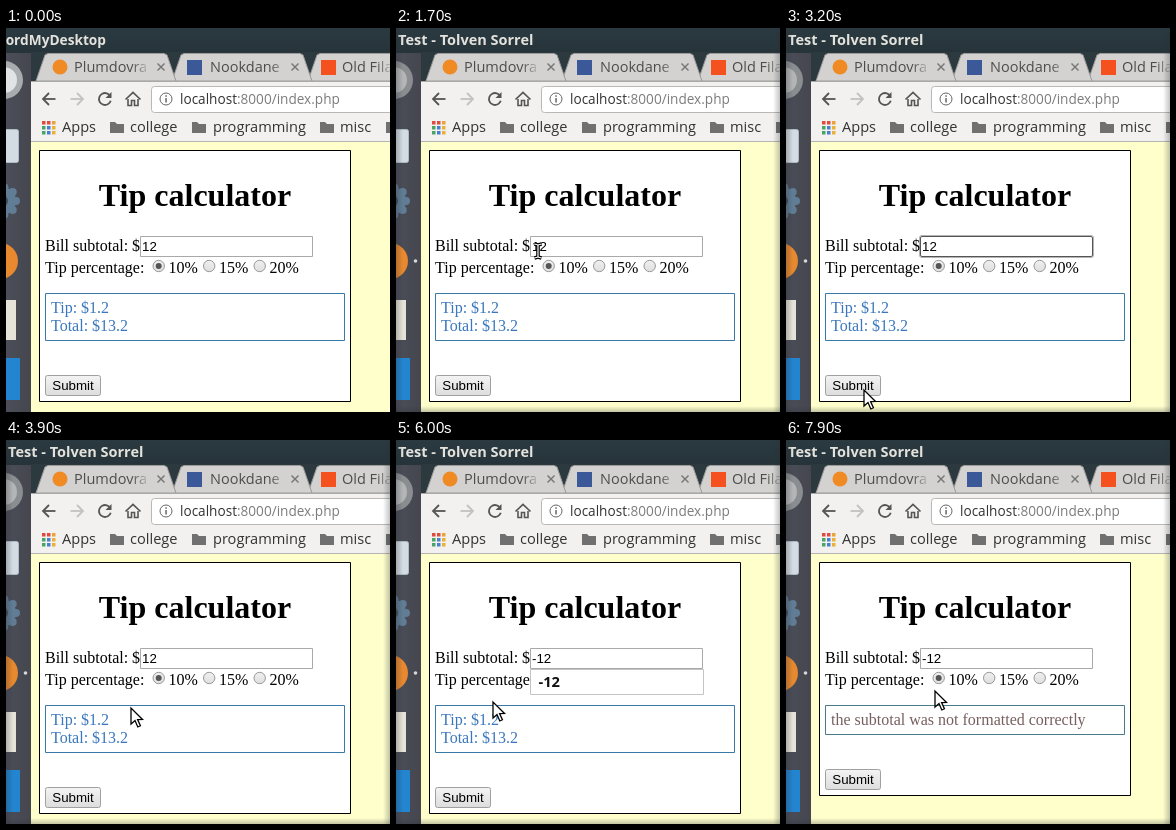
Write an HTML page with a canvas that moves like this. It is 384 px wide and 384 px high and loops after 8 s.

```html
<!DOCTYPE html>
<html lang="en">
<head>
<meta charset="utf-8">
<title>Tip calculator</title>
<style>
html, body { margin: 0; width: 100%; height: 100%; overflow: hidden; background: #ffffcc; }
canvas { display: block; width: 384px; height: 384px; }
</style>
</head>
<body>
<canvas id="stage" width="384" height="384"></canvas>
<script>
const ctx = document.getElementById('stage').getContext('2d');
const LOOP = 8000, STEP = 100;
const UI = '"Open Sans", "Noto Sans", sans-serif';
const SERIF = '"Liberation Serif", "Times New Roman", serif';
const SANS = '"Liberation Sans", Arial, sans-serif';

// Moments of change, in ms
const T = { title: 400, focus: 1900, sent: 3500, refocus: 4000, drag: 4200, minus: 4700,
            one: 5100, two: 5400, blur: 5800, close: 6300, error: 7200 };

// Pointer hot spots: time, x, y
const PATH = [
  [500, 262, 390], [800, 242, 334], [1000, 217, 331], [1300, 191, 271], [1600, 142, 223],
  [2300, 142, 223], [2600, 162, 277], [2900, 127, 332], [3200, 78, 362], [3600, 78, 362],
  [4100, 150, 217], [4200, 150, 217], [4500, 58, 209], [5600, 58, 209], [6000, 97, 262],
  [6300, 100, 312], [6700, 77, 358], [7300, 77, 358], [7800, 149, 251], [8000, 149, 251]
];

function rect(x, y, w, h, fill) {
  ctx.fillStyle = fill;
  ctx.fillRect(x, y, w, h);
}

function frame(x, y, w, h, line, fill, r = 0) {
  ctx.beginPath();
  ctx.roundRect(x + 0.5, y + 0.5, w - 1, h - 1, r);
  if (fill) { ctx.fillStyle = fill; ctx.fill(); }
  ctx.strokeStyle = line;
  ctx.lineWidth = 1;
  ctx.stroke();
}

function disc(x, y, r, fill, line) {
  ctx.beginPath();
  ctx.arc(x, y, r, 0, Math.PI * 2);
  if (fill) { ctx.fillStyle = fill; ctx.fill(); }
  if (line) { ctx.strokeStyle = line; ctx.lineWidth = 1; ctx.stroke(); }
}

function text(s, x, y, font, fill, align = 'left') {
  ctx.font = font;
  ctx.fillStyle = fill;
  ctx.textAlign = align;
  ctx.fillText(s, x, y);
}

function poly(points, fill, line, width = 1, closed = true) {
  ctx.beginPath();
  points.forEach(([x, y], i) => i ? ctx.lineTo(x, y) : ctx.moveTo(x, y));
  if (closed) ctx.closePath();
  if (fill) { ctx.fillStyle = fill; ctx.fill(); }
  if (line) { ctx.strokeStyle = line; ctx.lineWidth = width; ctx.stroke(); }
}

function fade(x0, y0, x1, y1, from, to) {
  const g = ctx.createLinearGradient(x0, y0, x1, y1);
  g.addColorStop(0, from);
  g.addColorStop(1, to);
  return g;
}

function launcher(active) {
  rect(0, 24, 25, 360, fade(0, 0, 25, 0, '#4b4e59', '#45464e'));
  disc(-2, 52, 19, active ? '#8b8e91' : '#a9acae');
  disc(-2, 52, 13, active ? '#b3b5b7' : '#e2e3e4');
  frame(-6, 101, 19, 34, '#aebbc5', '#d3dce2', 2);
  for (let i = -2; i < 3; i++) {
    const a = i * 0.7;
    disc(-4 + Math.cos(a) * 14, 173 + Math.sin(a) * 14, 4, '#617d95');
  }
  disc(-4, 173, 14, '#617d95');
  disc(-4, 173, 6, '#3d4d5c');
  disc(-6, 233, 18, '#e8892f');
  rect(0, 272, 10, 40, '#e6e3d8');
  rect(0, 330, 14, 42, '#2384cf');
  if (active) disc(19.5, 233, 1.8, '#d8d8d8');
}

function tab(x, w) {
  poly([[x, 53], [x + 9, 27], [x + 12, 25.5], [x + w - 8, 25.5], [x + w - 5, 27], [x + w + 4, 53]],
    '#d3d2d1', '#9b9a99');
}

function tabTitle(s, x, end) {
  text(s, x, 44, '14.5px ' + UI, fade(end - 16, 0, end, 0, '#4c4c4c', 'rgba(76,76,76,.15)'));
}

function cross(x, y) {
  poly([[x - 3.5, y - 3.5], [x + 3.5, y + 3.5]], null, '#777', 1.4, false);
  poly([[x - 3.5, y + 3.5], [x + 3.5, y - 3.5]], null, '#777', 1.4, false);
}

function arrow(x, y, dir, color) {
  poly([[x - dir * 6.5, y], [x + dir * 6, y]], null, color, 1.8, false);
  poly([[x, y - 6], [x + dir * 6, y], [x, y + 6]], null, color, 1.8, false);
}

function folder(x) {
  poly([[x, 94], [x + 5, 94], [x + 7, 96], [x + 14, 96], [x + 14, 105], [x, 105]], '#707070');
}

function browser(active) {
  rect(0, 0, 384, 25, fade(0, 0, 0, 25, '#2b3a41', '#26343a'));
  if (active) text('Test - Tolven Sorrel', 2, 17, 'bold 14.5px ' + UI, '#e4e2dc');
  else text('ordMyDesktop', 100, 17, 'bold 13.7px ' + UI, '#e4e2dc', 'right');

  rect(25, 24, 359, 30, '#2c393f');
  tab(302, 136);
  tab(166, 136);
  tab(30, 136);
  disc(54, 39, 7.5, '#f08a24');
  tabTitle('Plumdovra', 68, 142);
  cross(155, 39);
  rect(181, 32, 15, 15, '#3b5998');
  tabTitle('Nookdane', 204, 280);
  cross(289, 39);
  rect(315, 32, 15, 15, '#f4511e');
  tabTitle('Old Fila', 336, 386);

  rect(25, 53, 359, 61, '#f2f1f0');
  rect(25, 53, 359, 1, '#aaa9a8');
  arrow(43, 71, -1, '#555');
  arrow(71, 71, 1, '#c2c2c2');
  ctx.beginPath();
  ctx.arc(99, 71, 6, 0.3, Math.PI * 1.75);
  ctx.strokeStyle = '#555';
  ctx.lineWidth = 1.8;
  ctx.stroke();
  poly([[105.5, 64], [105.5, 70], [99.5, 70]], '#555');
  poly([[119.5, 71.5], [127, 64.5], [134.5, 71.5]], null, '#555', 1.7, false);
  poly([[122, 71], [122, 77.5], [125.5, 77.5], [125.5, 72.5], [128.5, 72.5],
    [128.5, 77.5], [132, 77.5], [132, 71]], null, '#555', 1.6, false);

  frame(145, 58, 260, 27, '#b9b8b7', '#fff', 3);
  disc(160, 71, 6, null, '#666');
  rect(159.3, 70, 1.5, 4.5, '#666');
  rect(159.3, 67.3, 1.5, 1.5, '#666');
  const font = '13.6px ' + UI;
  text('localhost', 174, 76, font, '#333');
  text(':8000/index.php', 174 + ctx.measureText('localhost').width, 76, font, '#7c7c7c');

  const dots = ['#e04a3f', '#e04a3f', '#e8a33a', '#4aa564', '#4a7fd0', '#e8b23a', '#4aa564', '#4a7fd0', '#e8b23a'];
  dots.forEach((c, i) => rect(36 + i % 3 * 5, 93 + Math.floor(i / 3) * 5, 3.5, 3.5, c));
  [['Apps', 56], ['college', 124], ['programming', 207], ['misc', 334]]
    .forEach(([s, x]) => text(s, x, 104, '14.6px ' + UI, '#333'));
  [104, 186, 314, 380].forEach(folder);
  rect(25, 113, 359, 1, '#b5b4b2');
}

function radio(x, label, on) {
  disc(x, 238, 5.7, fade(0, 232, 0, 244, '#f0f0f0', '#dedede'), '#999');
  if (on) disc(x, 238, 3, '#555');
  text(label, x + 9.7, 245, '16px ' + SERIF, '#000');
}

function bill(t) {
  if (t < T.minus) return '12';
  if (t < T.one) return '-';
  return t < T.two ? '-1' : '-12';
}

function inputBox(t) {
  const focused = (t >= T.focus && t < T.sent) || (t >= T.refocus && t < T.blur);
  const value = bill(t), font = '13.33px ' + SANS;
  frame(134, 208, 173, 21, focused ? '#555' : '#a9a9a9', '#fff', focused ? 1.5 : 0);
  if (focused) frame(133, 207, 175, 23, 'rgba(90,90,90,.45)', null, 2);
  ctx.font = font;
  const w = ctx.measureText(value).width;
  const selected = t >= T.drag + 200 && t < T.minus;
  if (selected) rect(136, 211, w, 15, '#3f8fe0');
  text(value, 136, 223, font, selected ? '#fff' : '#000');
  if (focused && !selected && t >= T.minus) rect(Math.round(136 + w), 211, 1, 15, '#000');
}

function suggestions(t) {
  if (t < T.minus || t >= T.close) return;
  const rows = t < T.two ? ['-12', '-1'] : ['-12'];
  frame(134, 229, 174, rows.length * 24 + 2, '#c4c4c4', '#fff');
  rows.forEach((s, i) => text(s, 142.5, 247 + i * 24, 'bold 14.7px ' + UI, '#111'));
}

function page(t) {
  const failed = t >= T.error, lift = failed ? 18 : 0;
  const body = '16px ' + SERIF;
  rect(25, 114, 359, 270, '#ffffcc');
  frame(33, 122, 312, 252 - lift, '#000', '#fff');
  text('Tip calculator', 189, 178, 'bold 32px ' + SERIF, '#000', 'center');
  text('Bill subtotal: $', 39, 223, body, '#000');
  text('Tip percentage:', 39, 245, body, '#000');
  ['10%', '15%', '20%'].forEach((s, i) => radio(152.7 + i * 50.5, s, i === 0));

  frame(39, 265, 300, 48 - lift, failed ? '#497b86' : '#3879a8');
  if (failed) {
    text('the subtotal was not formatted correctly', 45, 285, body, '#785f5f');
  } else {
    text('Tip: $1.2', 45, 285, body, '#3a77bd');
    text('Total: $13.2', 45, 303, body, '#3a77bd');
  }

  const y = 347 - lift;
  frame(39, y, 56, 21, '#a0a0a0', fade(0, y, 0, y + 21, '#f4f4f4', '#dcdcdc'), 2);
  text('Submit', 67, y + 15, '13.33px ' + SANS, '#000', 'center');
  inputBox(t);
  suggestions(t);
}

function pointer(t) {
  if (t < PATH[0][0]) return;
  const i = Math.min(PATH.findIndex(p => p[0] > t), PATH.length - 1);
  const [t0, x0, y0] = PATH[i - 1], [t1, x1, y1] = PATH[i];
  const k = (t - t0) / (t1 - t0), e = k * k * (3 - 2 * k);
  const x = x0 + (x1 - x0) * e, y = y0 + (y1 - y0) * e;
  const overInput = x > 134 && x < 307 && y > 208 && y < 229;
  ctx.save();
  ctx.translate(Math.round(x), Math.round(y));
  if (overInput || (t >= T.drag && t <= 5600)) {
    for (const [color, w] of [['#000', 3.6], ['#fff', 1.2]]) {
      poly([[-3.5, -7], [0, -6], [3.5, -7]], null, color, w, false);
      poly([[0, -6], [0, 6]], null, color, w, false);
      poly([[-3.5, 7], [0, 6], [3.5, 7]], null, color, w, false);
    }
  } else {
    poly([[0, 0], [0, 16], [4, 12.5], [6.8, 19], [9.4, 17.8], [6.6, 11.6], [11.5, 11.5]], '#fff', '#000', 1.3);
  }
  ctx.restore();
}

function edges() {
  const dark = 'rgba(40,45,50,.28)', none = 'rgba(40,45,50,0)';
  rect(0, 0, 7, 384, fade(0, 0, 7, 0, dark, none));
  rect(377, 0, 7, 384, fade(384, 0, 377, 0, dark, none));
  rect(0, 378, 384, 6, fade(0, 384, 0, 378, dark, none));
}

function draw(now) {
  const t = Math.floor(now % LOOP / STEP) * STEP;
  const active = t >= T.title;
  launcher(active);
  browser(active);
  page(t);
  if (active) edges();
  pointer(t);
}

const start = performance.now();
function tick() {
  draw(performance.now() - start);
  requestAnimationFrame(tick);
}
tick();
</script>
</body>
</html>
```
